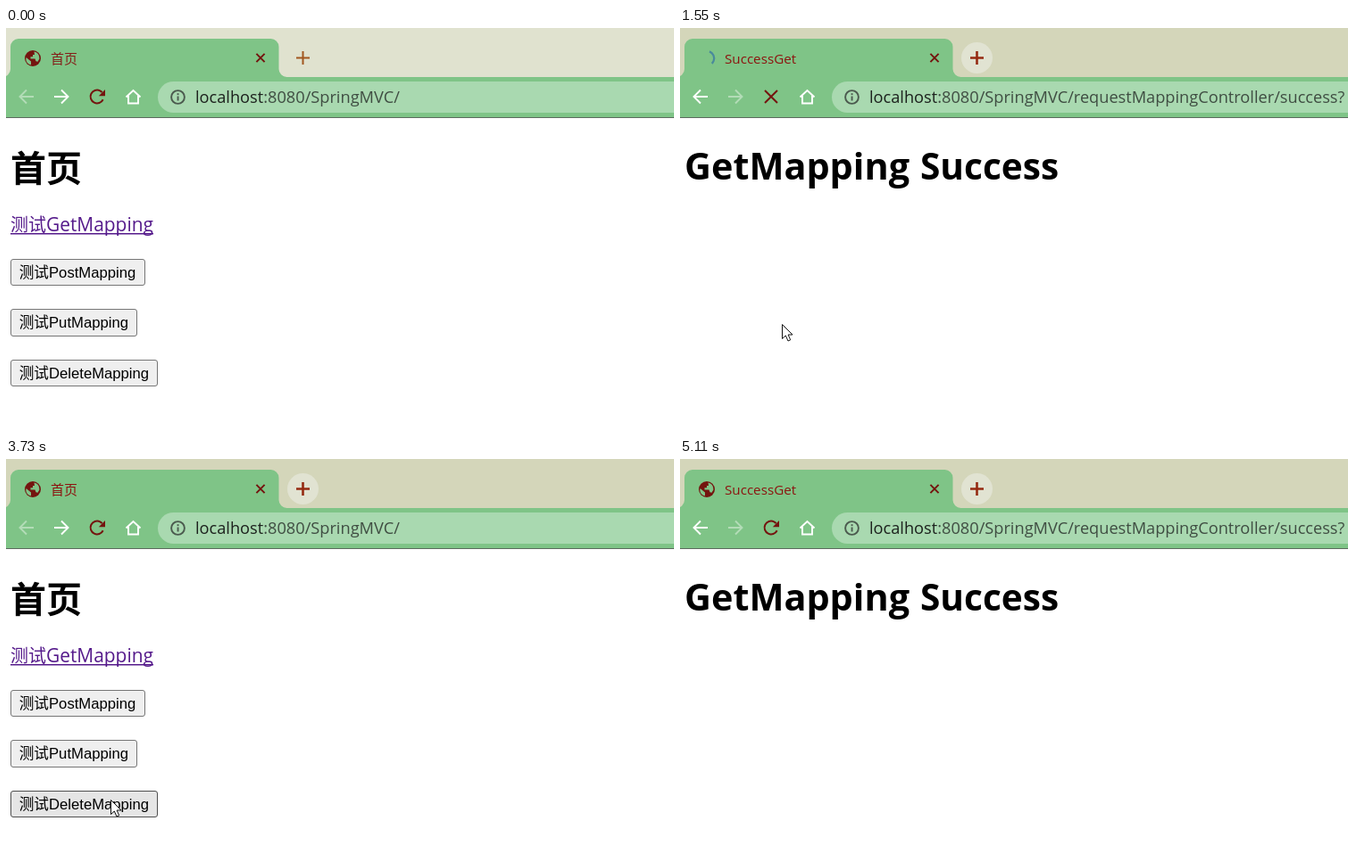
These frames come from a looping animation (748 by 452 pixels, 5770 ms). An HTML page with a canvas:

```html
<!DOCTYPE html>
<html lang="zh-CN">
<head>
<meta charset="utf-8">
<title>首页</title>
<style>
html, body { margin: 0; width: 100%; height: 100%; overflow: hidden; background: #fff; }
canvas { display: block; width: 748px; height: 452px; }
</style>
</head>
<body>
<canvas id="stage" width="748" height="452"></canvas>
<script>
const ctx = document.getElementById('stage').getContext('2d');
const LOOP = 5770, STEP = 70;
const CJK = '"Noto Sans CJK SC", "Noto Sans CJK", "Noto Sans CJK JP", sans-serif';
const UI = '"Open Sans", "Noto Sans", sans-serif';
const ARIAL = '"Liberation Sans", Arial, sans-serif';
const GREEN = '#7fc487', PALE = '#b3dcb7', RED = '#74140f';

// Spans in which the picture moves; it holds still between them.
const SPANS = [[280, 750], [880, 950], [1150, 1690], [1760, 2330], [2400, 2960],
  [3030, 3590], [3660, 4220], [4290, 4500], [4960, 5110]];

// Pointer tip: time, x, y
const PATH = [[280, 434, 413], [750, 128, 334], [880, 128, 334], [950, 114, 332],
  [1690, 114, 332], [2330, 34, 148], [2680, 26, 93], [2960, 23, 81], [3030, 23, 81],
  [3590, 117, 382], [3730, 117, 382], [3800, 119, 385], [4890, 119, 385], [5040, 302, 412]];

const BUTTONS = [['PostMapping', 259, 151, 30], ['PutMapping', 315, 142, 31], ['DeleteMapping', 372, 165, 30]];

const within = (t, a, b) => t >= a && t < b;

function snap(t) {
  let s = 0;
  for (const [a, b] of SPANS) {
    if (t < a) break;
    s = Math.min(a + STEP * Math.floor((t - a) / STEP), b);
  }
  return s;
}

function pointerAt(t) {
  if (!within(t, 280, 5100)) return null;
  const i = PATH.findIndex(p => p[0] > t);
  if (i < 0) return PATH[PATH.length - 1].slice(1);
  const [t0, x0, y0] = PATH[i - 1], [t1, x1, y1] = PATH[i];
  const k = (t - t0) / (t1 - t0);
  return [Math.round(x0 + (x1 - x0) * k), Math.round(y0 + (y1 - y0) * k)];
}

function text(str, x, y, size, family, color, weight = 400) {
  ctx.font = `${weight} ${size}px ${family}`;
  ctx.fillStyle = color;
  ctx.fillText(str, x, y);
  return x + ctx.measureText(str).width;
}

function rect(x, y, w, h, color) {
  ctx.fillStyle = color;
  ctx.fillRect(x, y, w, h);
}

function disc(x, y, r, color) {
  ctx.fillStyle = color;
  ctx.beginPath();
  ctx.arc(x, y, r, 0, 7);
  ctx.fill();
}

function arc(x, y, r, from, to, color, width) {
  ctx.strokeStyle = color;
  ctx.lineWidth = width;
  ctx.beginPath();
  ctx.arc(x, y, r, from, to);
  ctx.stroke();
}

function line(d, color, width) {
  ctx.strokeStyle = color;
  ctx.lineWidth = width;
  ctx.stroke(new Path2D(d));
}

function fill(d, color) {
  ctx.fillStyle = color;
  ctx.fill(new Path2D(d));
}

function cross(x, y, r, color, width) {
  line(`M${x - r} ${y - r}l${2 * r} ${2 * r}M${x + r} ${y - r}l${-2 * r} ${2 * r}`, color, width);
}

function arrow(x, dir, color) {
  line(`M${x - 8 * dir} 77H${x + 7 * dir}M${x} 69.5L${x + 7.5 * dir} 77L${x} 84.5`, color, 1.9);
}

function globe() {
  disc(30, 34, 9, RED);
  fill('M22.6 33L28 37.5V41.3C24 40.5 21.5 37 22.6 33Z', GREEN);
  fill('M31.5 26.6C35.5 27.4 37.5 30.5 37.4 34.5L35.5 37.8L33.5 37.2L32.5 34.5H27.5V32.3H30V30H32Z', GREEN);
}

function reload() {
  arc(102, 77, 7.4, 0.45, 5.55, RED, 2);
  fill('M111 69V76.2H103.8Z', RED);
}

function drawChrome(s) {
  rect(0, 0, 748, 55, s.active ? '#d4d6ba' : '#e0e2cf');
  fill('M-4 55A9 9 0 0 0 5 46V21A9 9 0 0 1 14 12H296.5A9 9 0 0 1 305.5 21V46A9 9 0 0 0 314.5 55Z', GREEN);
  rect(0, 55, 748, 45, GREEN);
  rect(0, 100, 748, 1, '#5c6a5e');

  if (s.loading) {
    const a = (s.t - 1500) / 160;
    arc(30, 34, 8.2, a - 1.2, a + 0.8, '#4a8a9c', 2.2);
  } else globe();
  const ink = s.active ? '#8c1410' : '#84201a';
  if (s.titleDone) text('SuccessGet', 50, 40, 15.2, UI, ink);
  else text('首页', 50, 39.5, 15, CJK, ink);
  cross(285, 33.5, 4.6, RED, 2);

  if (s.active) disc(332.5, 33.5, 17.5, '#e1e3d2');
  line('M325 33.5H340M332.5 26V41', s.active ? '#952a12' : '#a1561f', s.active ? 2.6 : 2);

  if (s.pointer && Math.hypot(s.pointer[0] - 22, s.pointer[1] - 77) < 16) disc(22, 77, 16, '#9bd1a1');
  arrow(23, -1, s.success ? '#fff' : PALE);
  arrow(62, 1, s.success ? PALE : '#fff');
  if (s.loading) cross(102, 77, 7, RED, 2);
  else reload();
  line('M134.5 77.5L142.5 70L150.5 77.5M137 76V84.5H148V76', '#fff', 1.9);

  ctx.fillStyle = '#a9d9b0';
  ctx.beginPath();
  ctx.roundRect(170, 60, 620, 35, 17.5);
  ctx.fill();
  arc(192.5, 77.5, 7.4, 0, 7, '#4b5a4e', 1.9);
  rect(191.6, 76.5, 1.9, 5, '#4b5a4e');
  rect(191.6, 73.2, 1.9, 1.9, '#4b5a4e');
  const x = text('localhost', 212, 84, 18.2, UI, '#1c211d');
  const rest = s.success ? 'requestMappingController/success?' : '';
  text(':8080/SpringMVC/' + rest, x, 84, 18.2, UI, '#3f4d42');
}

function drawButton([label, y, w, h], pointer) {
  const hover = pointer && within(pointer[0], 5, 5 + w) && within(pointer[1], y, y + h);
  ctx.beginPath();
  ctx.roundRect(5.5, y + 0.5, w - 1, h - 1, 2.5);
  ctx.fillStyle = hover ? '#e5e5e5' : '#efefef';
  ctx.fill();
  ctx.strokeStyle = hover ? '#4f4f4f' : '#767676';
  ctx.lineWidth = 1;
  ctx.stroke();
  const base = y + 21.3;
  const x = text('测试', 14.7, base, 16.67, CJK, '#000');
  text(label, x, base, 16.67, ARIAL, '#000');
}

function drawHome(pointer) {
  text('首页', 5, 172, 40, CJK, '#000', 700);
  const violet = '#551a8b';
  text('测试', 5, 228, 20, CJK, violet);
  text('GetMapping', 45, 228, 20.9, UI, violet);
  rect(5, 230, 160, 1.5, violet);
  for (const b of BUTTONS) drawButton(b, pointer);
}

function drawSuccess() {
  text('GetMapping', 5, 170, 41.4, UI, '#000', 700);
  text('Success', 269, 170, 40.6, UI, '#000', 700);
}

function drawPointer([x, y], pressed) {
  if (pressed) {
    ctx.globalCompositeOperation = 'multiply';
    disc(x + 1, y, 15, '#f6f26e');
    ctx.globalCompositeOperation = 'source-over';
  }
  ctx.save();
  ctx.translate(x + 0.5, y + 0.5);
  const d = 'M0 0V16L3.8 12.5L6.5 18.5L9.2 17.3L6.6 11.5H11.5Z';
  fill(d, '#fff');
  line(d, '#111', 1);
  ctx.restore();
}

function draw(now) {
  const t = snap(now % LOOP);
  const s = {
    t,
    active: t >= 1220,
    loading: within(t, 1290, 1830) || within(t, 3870, 4500),
    success: within(t, 1430, 3030) || t >= 4080,
    titleDone: within(t, 1430, 3030) || t >= 4290,
    pressed: within(t, 1150, 1290) || within(t, 2890, 3030) || within(t, 3800, 3940),
    pointer: pointerAt(t)
  };
  rect(0, 0, 748, 452, '#fff');
  drawChrome(s);
  if (s.success) drawSuccess();
  else drawHome(s.pointer);
  if (s.pointer) drawPointer(s.pointer, s.pressed);
}

const start = performance.now();
function tick() {
  draw(performance.now() - start);
  requestAnimationFrame(tick);
}
tick();
</script>
</body>
</html>
```
